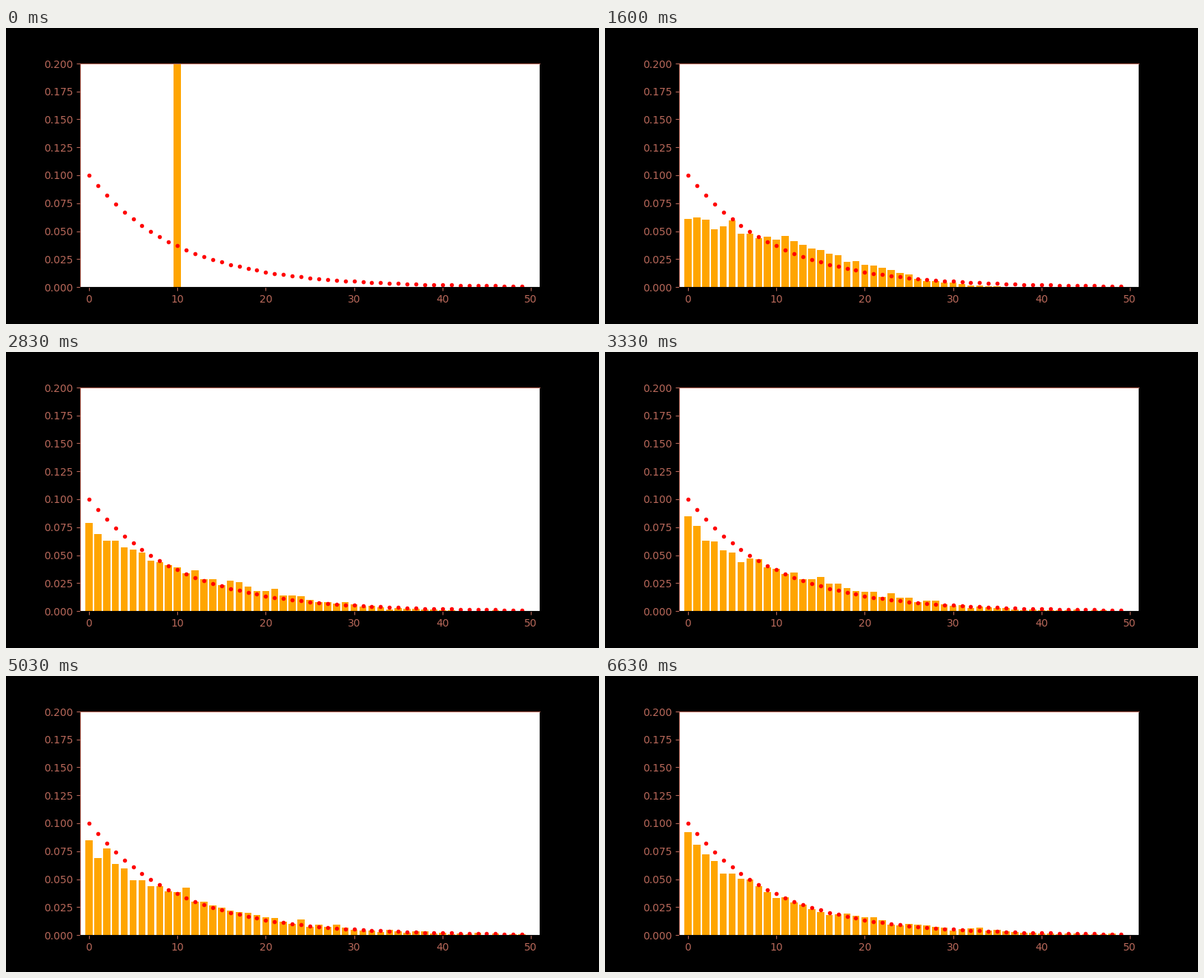
A matplotlib script that plays this animation: 800 by 400 pixels, repeating every 6660 ms.

```python
import random

import matplotlib.pyplot as plt
import numpy as np
from matplotlib.animation import FuncAnimation

AGENTS = 5000
MEAN = 10
LEVELS = 50
FRAMES = 200
LOOP_MS = 6660
LABEL = "#b8685a"

plt.rcParams.update({"font.family": "DejaVu Sans", "font.size": 10})


def simulate(seed):
    """Share of agents at each wealth level, one row per frame."""
    rng = random.Random(seed)
    money = [MEAN] * AGENTS
    rows = []
    for _ in range(FRAMES):
        counts = np.bincount(money, minlength=LEVELS)[:LEVELS]
        rows.append(counts / AGENTS)
        givers = rng.choices(range(AGENTS), k=AGENTS)
        takers = rng.choices(range(AGENTS), k=AGENTS)
        for giver, taker in zip(givers, takers):
            if money[giver] > 0:
                money[giver] -= 1
                money[taker] += 1
    return rows


shares = simulate(seed=4)
levels = np.arange(LEVELS)

fig, ax = plt.subplots(figsize=(8, 4), dpi=100, facecolor="black")
fig.subplots_adjust(left=0.125, right=0.9, bottom=0.125, top=0.88)
ax.set_xlim(-1, 51)
ax.set_ylim(0, 0.2)
ax.tick_params(colors=LABEL)
for side in ("top", "left"):
    ax.spines[side].set_color(LABEL)

bars = ax.bar(levels, shares[0], width=0.8, color="orange")
ax.plot(levels, np.exp(-levels / MEAN) / MEAN, "r.")


def update(frame):
    for bar, share in zip(bars, shares[frame]):
        bar.set_height(share)
    return bars


anim = FuncAnimation(fig, update, frames=FRAMES, interval=LOOP_MS / FRAMES,
                     repeat=True, repeat_delay=0, blit=False)
plt.show()
```
